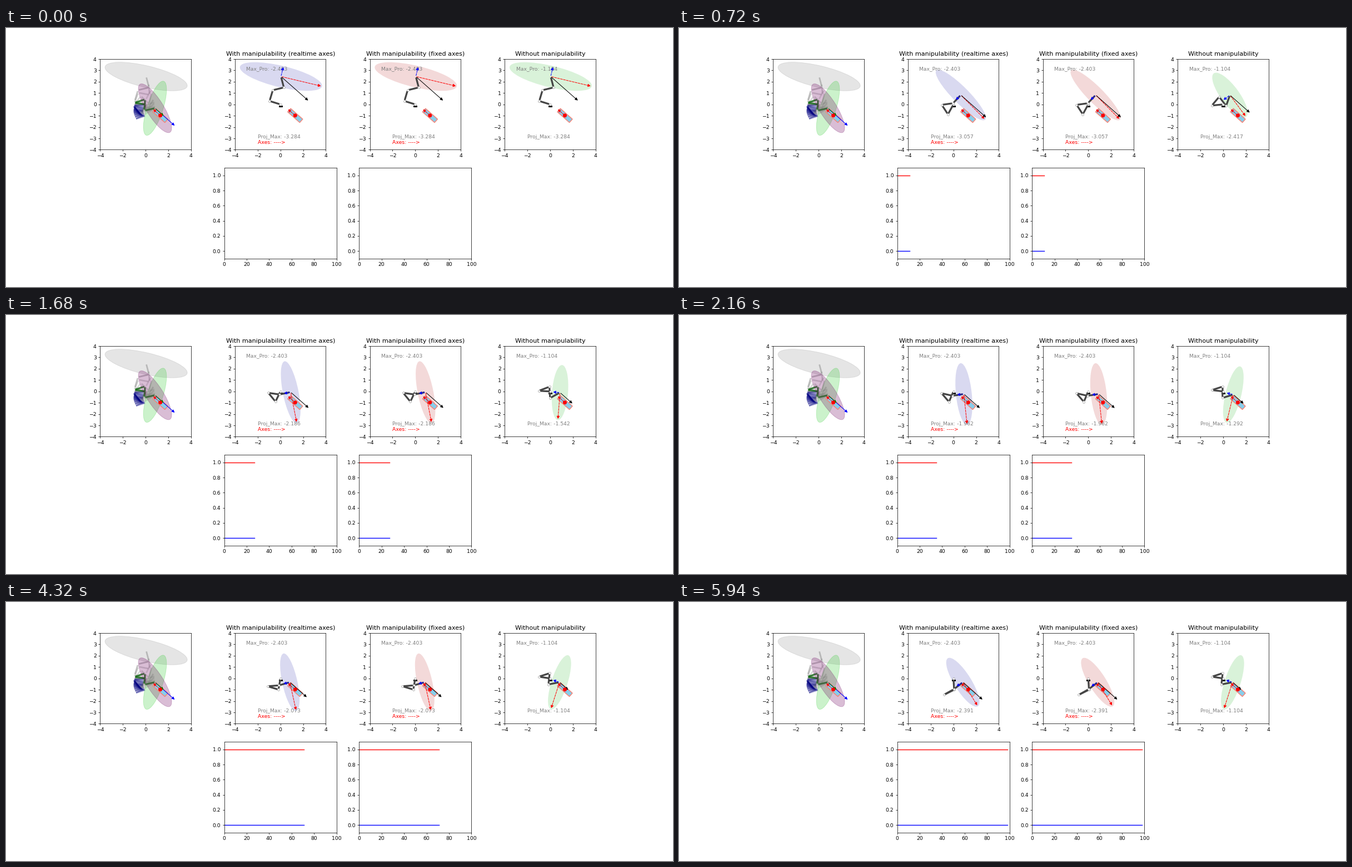
Recreate the animation shown at these times as a matplotlib script. Size 1200 by 467 pixels, loop 6 s.

```python
import numpy as np
import matplotlib.pyplot as plt
from matplotlib.animation import FuncAnimation
from matplotlib.collections import LineCollection
from matplotlib.patches import Circle, Ellipse, FancyArrowPatch, Rectangle

FRAMES, STEP = 100, 60
KEYS = np.array([0, 12, 20, 36, 51, 72, 99])
U = np.exp(-1j * np.radians(41.5))      # task direction
GOAL = 1.3 - 0.98j

# absolute link angles (deg), tip path and projection at the key times
WITH = dict(
    angles=[[162, 73, 14, 104], [241, 123, 8, 47], [242, 128, 0, 19],
            [247, 131, -13, 9], [253, 144, -12, 11], [262, 163, 4, 15],
            [276, 206, 30, 38]],
    x=[.05, .65, .86, .92, .85, .83, .83],
    y=[2.46, .83, .22, -.23, -.33, -.34, -.34],
    proj=[3.284, 3.057, 2.565, 1.962, 1.895, 2.073, 2.391])
WITHOUT = dict(
    angles=[[162, 73, 14, 104], [184, 50, -50, 70], [181, 28, -77, 48],
            [174, 18, -92, 17], [172, 17, -95, 10], [172, 17, -95, 10],
            [172, 17, -95, 10]],
    x=[.05, .60, .80, .90, .83, .83, .83],
    y=[2.46, .82, .23, -.28, -.34, -.34, -.34],
    proj=[3.284, 2.417, 1.909, 1.292, 1.104, 1.104, 1.104])


def glide(values, n):
    """Monotone cubic interpolation through the key times."""
    v = np.asarray(values, float)
    h = np.diff(KEYS)
    s = np.diff(v) / h
    m = np.zeros(len(v))
    same = s[:-1] * s[1:] > 0
    a, b = s[:-1][same], s[1:][same]
    m[1:-1][same] = 2 * a * b / (a + b)
    m[0] = (3 * s[0] - m[1]) / 2
    m[-1] = (3 * s[-1] - m[-2]) / 2
    i = np.clip(np.searchsorted(KEYS, n, side="right") - 1, 0, len(h) - 1)
    t = (n - KEYS[i]) / h[i]
    return ((1 + 2 * t) * (1 - t) ** 2 * v[i] + t * (1 - t) ** 2 * h[i] * m[i]
            + t * t * (3 - 2 * t) * v[i + 1] + t * t * (t - 1) * h[i] * m[i + 1])


def reach(angles):
    """Vectors from each joint to the tip, for unit links."""
    return np.cumsum(np.exp(1j * angles)[::-1])[::-1]


def solve(angles, goal):
    """Least-squares correction of a pose so that its tip meets the goal."""
    for _ in range(5):
        link = 1j * np.exp(1j * angles)
        err = goal - reach(angles)[0]
        jac = np.array([link.real, link.imag])
        angles = angles + np.linalg.pinv(jac, rcond=.05) @ [err.real, err.imag]
    return angles


def trajectory(arm):
    poses = []
    cols = np.array(arm["angles"]).T
    for n in range(FRAMES):
        guess = np.radians([glide(c, n) for c in cols])
        tip = glide(arm["x"], n) + 1j * glide(arm["y"], n)
        poses.append((solve(guess, tip), glide(arm["proj"], n)))
    return poses


def ellipse_axes(angles):
    """Tip, major and minor manipulability axes as complex vectors."""
    d = reach(angles)
    xx, yy, xy = sum(d.imag ** 2), sum(d.real ** 2), -sum(d.real * d.imag)
    root = np.hypot((xx - yy) / 2, xy)
    mid = (xx + yy) / 2
    major = np.exp(.5j * np.arctan2(2 * xy, xx - yy))
    if major.imag > 0:
        major = -major
    minor = 1j * major
    if (minor.imag if xx > yy else -minor.real) < 0:
        minor = -minor
    return d[0], major * np.sqrt(mid + root), minor * np.sqrt(max(mid - root, 0))


def xy(z):
    return z.real, z.imag


def ellipse_shape(angles):
    tip, major, minor = ellipse_axes(angles)
    return dict(width=2 * abs(major), height=2 * abs(minor),
                angle=np.degrees(np.angle(major)))


def links(angles, gap=0.0):
    p = np.concatenate([[0], np.cumsum(np.exp(1j * angles))])
    step = np.diff(p) * gap
    return [[xy(a), xy(b)] for a, b in zip(p[:-1] + step, p[1:] - step)], p


def arrow(ax, color, start=0j, end=1 + 0j, dashed=False, z=5):
    patch = FancyArrowPatch(xy(start), xy(end), arrowstyle="-|>",
                            mutation_scale=11, color=color, lw=1.1, zorder=z,
                            linestyle="--" if dashed else "-")
    return ax.add_patch(patch)


def setup(ax, title=""):
    ax.set_aspect("equal")
    ax.set(xlim=(-4, 4), ylim=(-4, 4), title=title,
           xticks=range(-4, 5, 2), yticks=range(-4, 5))
    corner = GOAL - U * (.71 + .2j)
    ax.add_patch(Rectangle(xy(corner), 1.42, .4, angle=np.degrees(np.angle(U)),
                           fc="skyblue", ec="salmon", lw=1.5, zorder=3))
    arrow(ax, "red", GOAL, GOAL - .92 * U, dashed=True, z=4)
    ax.add_patch(Circle(xy(GOAL), .15, color="red", zorder=6))


class Scene:
    def __init__(self, ax, title, poses, best, color, axes_note):
        setup(ax, title)
        self.poses = poses
        self.ell = ax.add_patch(Ellipse((0, 0), 1, 1, fc=color, ec="none",
                                        alpha=.15, zorder=1))
        ax.text(-3, 3, f"Max_Pro: -{best:.3f}", color="gray")
        self.label = ax.text(-2, -3, "", color="gray")
        if axes_note:
            ax.text(-2, -3.5, "Axes: ---->", color="red")
        ax.add_patch(Rectangle((-.14, -.22), .28, .13, color="black", zorder=3))
        self.arm = ax.add_collection(LineCollection([], colors="#454545",
                                                    linewidths=3.5, zorder=4))
        self.joints, = ax.plot([], [], "o", ms=4, mfc="white", mec="gray",
                               mew=.6, zorder=4.5)
        self.major = arrow(ax, "red", dashed=True)
        self.minor = arrow(ax, "blue", dashed=True)
        self.force = arrow(ax, "black")

    def show(self, n):
        angles, proj = self.poses[n]
        tip, major, minor = ellipse_axes(angles)
        self.ell.set(center=xy(tip), **ellipse_shape(angles))
        segs, p = links(angles, .09)
        self.arm.set_segments(segs)
        self.joints.set_data(p[:-1].real, p[:-1].imag)
        for patch, v in ((self.major, major), (self.minor, minor),
                         (self.force, proj * U)):
            patch.set_positions(xy(tip), xy(tip + v))
        self.label.set_text(f"Proj_Max: -{proj:.3f}")


def overview(ax, poses, plain):
    setup(ax)

    def trail(path, frames, color, alpha, part=slice(None)):
        segs = [s for n in frames for s in links(path[n][0], .09)[0][part]]
        ax.add_collection(LineCollection(segs, colors=color, alpha=alpha,
                                         linewidths=3, zorder=2))

    trail(poses, [0], "gray", .45)
    trail(plain, range(4, 28, 6), "gray", .3)
    trail(poses, range(16, 100, 6), "navy", .35, slice(1, 3))
    trail(poses, range(16, 100, 12), "dimgray", .2, slice(0, 1))
    trail(poses, range(8, 100, 12), "dimgray", .2, slice(3, 4))
    trail(plain, [36, 44, 99], "darkgreen", .35)
    for angles, color, alpha in ((poses[0][0], "gray", .2),
                                 (plain[-1][0], "limegreen", .25),
                                 (poses[-1][0], (.45, .05, .4), .27)):
        ax.add_patch(Ellipse(xy(reach(angles)[0]), **ellipse_shape(angles),
                             color=color, alpha=alpha, zorder=2.5))
    tip = reach(poses[-1][0])[0]
    arrow(ax, "blue", tip, tip + 2.403 * U)
    arrow(ax, "green", tip, tip + 1.104 * U)


# 1200 x 467 pixels, with a hair of slack against rounding down
fig, grid = plt.subplots(2, 4, figsize=(18.0001, 7.0051), dpi=200 / 3)
poses, plain = trajectory(WITH), trajectory(WITHOUT)
overview(grid[0, 0], poses, plain)
scenes = [
    Scene(grid[0, 1], "With manipulability (realtime axes)", poses, 2.403,
          (0, 0, .62), True),
    Scene(grid[0, 2], "With manipulability (fixed axes)", poses, 2.403,
          (.71, 0, 0), True),
    Scene(grid[0, 3], "Without manipulability", plain, 1.104,
          (0, .67, 0), False)]

graphs = []
for ax in grid[1, 1:3]:
    ax.set(xlim=(0, 100), ylim=(-.1, 1.1),
           xticks=range(0, 101, 20), yticks=np.linspace(0, 1, 6))
    graphs += [(ax.plot([], [], color=c)[0], level)
               for c, level in (("red", 1), ("blue", 0))]
for ax in grid[1, ::3]:
    ax.axis("off")


def update(n):
    for scene in scenes:
        scene.show(n)
    for line, level in graphs:
        line.set_data(np.arange(n), np.full(n, level))
    return []


anim = FuncAnimation(fig, update, frames=FRAMES, interval=STEP, repeat=True,
                     repeat_delay=0)
plt.show()
```
